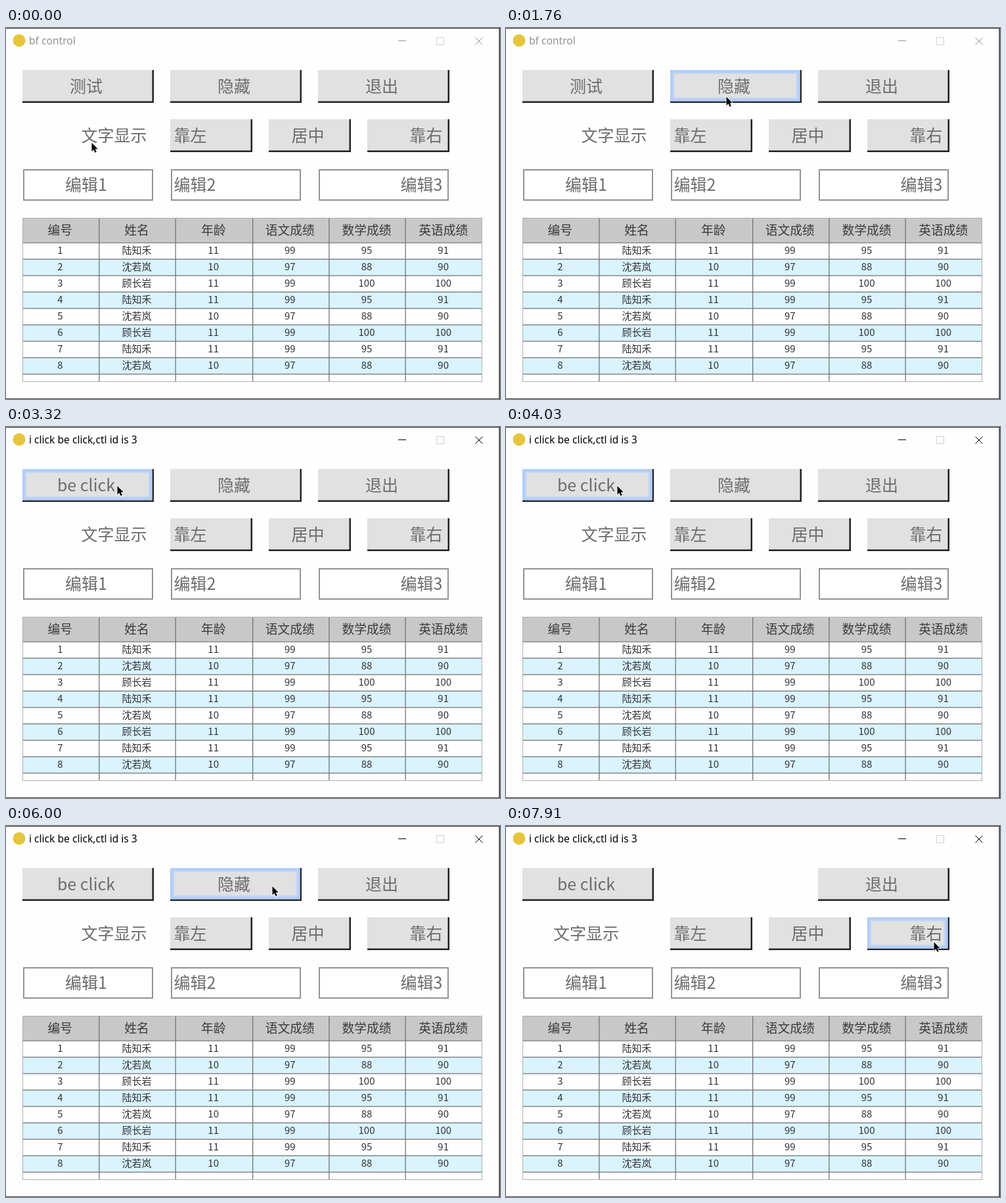
An HTML page for the animation above (8000 ms loop, 752 px wide and 565 px high).

```html
<!DOCTYPE html>
<html lang="zh-CN">
<head>
<meta charset="utf-8">
<title>bf control</title>
<style>
  html, body { margin: 0; width: 100%; height: 100%; overflow: hidden; background: #fefefe; }
  svg { display: block; width: 752px; height: 565px; }
  text { font-family: "Noto Sans CJK SC", "Noto Sans CJK", sans-serif; white-space: pre; }
  .control { font-size: 25px; fill: #6c6c6c; }
  .head { font-size: 18.75px; fill: #3a3a3a; }
  .cell { font-size: 15px; fill: #333; }
  .title { font: 15.6px "Noto Sans", "Noto Sans CJK SC", "Noto Sans CJK", sans-serif; }
  #frame { --ink: #000; }
  #frame.idle { --ink: #929292; }
  .title { fill: var(--ink); }
  .sign { stroke: var(--ink); fill: none; }
</style>
</head>
<body>
<svg viewBox="0 0 752 565" xmlns="http://www.w3.org/2000/svg">
  <rect width="752" height="565" fill="#fefefe"/>
  <path d="M0 .5H752" stroke="#3d3626"/>
  <path d="M750.5 1V565" stroke="#8b8a88"/>
  <path d="M751.5 0V565" stroke="#4a453c"/>
  <path d="M0 564.5H752" stroke="#4b4a35"/>
  <g id="frame" class="idle">
    <circle cx="20" cy="19" r="9.5" fill="#e6c53a"/>
    <text id="title" class="title" x="35" y="25"></text>
    <path class="sign" d="M597 19.5H609M714.5 14.5L725.5 25.5M725.5 14.5L714.5 25.5"/>
    <rect x="655.5" y="14.5" width="11" height="11" fill="none" stroke="#d2d2d2"/>
  </g>
  <g id="controls"></g>
  <g id="table"></g>
  <path id="cursor" d="M.5 .8V14L3.5 11.2L5.5 15.8L7.8 14.8L5.8 10.3H9.8Z" stroke="#fff" stroke-width="1.6" paint-order="stroke"/>
</svg>
<script>
const LOOP = 8000;
const STEP = 140;     // typical time between mouse samples
const SCALE = 1.25;   // display scaling of the window content
const LINE = SCALE;
const $ = id => document.getElementById(id);

function add(parent, tag, attrs, text) {
  const el = document.createElementNS("http://www.w3.org/2000/svg", tag);
  for (const key in attrs) el.setAttribute(key, attrs[key]);
  if (text !== undefined) el.textContent = text;
  parent.append(el);
  return el;
}

const box = (parent, x, y, width, height, attrs) =>
  add(parent, "rect", { x, y, width, height, ...attrs });

const write = (parent, cls, x, y, anchor, text) =>
  add(parent, "text", { class: cls, x, y, "text-anchor": anchor }, text);

// Text anchor point inside a control
const place = {
  start: (x, w) => x + 5.5,
  middle: (x, w) => x + w / 2 - 3,
  end: (x, w) => x + w - 10.5
};

function button(x, y, w, text, anchor) {
  const g = add($("controls"), "g");
  const h = 50, bevel = 2 * LINE;
  box(g, x, y, w, h, { fill: "#e1e1e1" });
  add(g, "path", {
    d: `M${x} ${y + h - bevel / 2}H${x + w - bevel / 2}V${y}`,
    fill: "none", stroke: "#222", "stroke-width": bevel
  });
  const glow = add(g, "g", { fill: "none" });
  const ring = (inset, stroke, width) =>
    box(glow, x + inset, y + inset, w - bevel - 2 * inset, h - bevel - 2 * inset, { stroke, "stroke-width": width });
  ring(2, "#b0cdfd", 4);
  ring(5, "#c6d6f0", 2);
  const label = write(g, "control", place[anchor](x, w), y + 34, anchor, text);
  return { g, glow, label, x, y, w, h };
}

function edit(x, text, anchor) {
  box($("controls"), x + 2, 216, 196, 46, { fill: "#fff", stroke: "#939393", "stroke-width": 2 });
  write($("controls"), "control", place[anchor](x, 200), 248, anchor, text);
}

const [test, hide, quit] = ["测试", "隐藏", "退出"].map((name, i) => button(25 + 225 * i, 64, 200, name, "middle"));
const anchors = ["start", "middle", "end"];
const aligners = ["靠左", "居中", "靠右"].map((name, i) => button(250 + 150 * i, 139, 125, name, anchors[i]));
const buttons = [test, hide, quit, ...aligners];
const caption = write($("controls"), "control", 0, 173, "end", "文字显示");
["middle", "start", "end"].forEach((anchor, i) => edit(25 + 225 * i, `编辑${i + 1}`, anchor));

function drawTable() {
  const g = $("table"), left = 25, top = 289, width = 700, height = 250;
  const col = width / 6, row = 25, body = top + 37.5;
  const heads = ["编号", "姓名", "年龄", "语文成绩", "数学成绩", "英语成绩"];
  const pupils = [
    ["陆知禾", 11, 99, 95, 91],
    ["沈若岚", 10, 97, 88, 90],
    ["顾长岩", 11, 99, 100, 100]
  ];
  const middle = i => left + col * (i + .5) - 1;
  const snap = x => Math.floor(x / SCALE + .01) * SCALE + LINE / 2;

  box(g, left, top, width, body - top, { fill: "#c8c8c8" });
  heads.forEach((name, i) => write(g, "head", middle(i), 315, "middle", name));
  let lines = "";
  for (let r = 0; r <= 8; r++) {
    const y = body + r * row;
    lines += `M${left} ${y + LINE / 2}h${width}`;
    if (r == 8) break;
    if (r % 2) box(g, left, y, width, row, { fill: "#d9f3ff" });
    [r + 1, ...pupils[r % 3]].forEach((v, i) => write(g, "cell", middle(i), y + 17.5, "middle", v));
  }
  for (let i = 1; i < 6; i++) lines += `M${snap(left + col * i)} ${top}v${height}`;
  add(g, "path", { d: lines, stroke: "#707070", "stroke-width": LINE });
  box(g, left + .5, top + .5, width - 1, height - 1, { fill: "none", stroke: "#b0b0b0" });
}
drawTable();

// Mouse strokes: start, end, then the point reached
const home = { x: 130, y: 174 };
const strokes = [
  [20, 570, 24, 190], [570, 980, 79, 110],
  [980, 1390, 228, 147], [1390, 1660, 335, 104], [1660, 2340, 169, 89],
  [4030, 4430, 379, 90], [4850, 5140, 421, 102],
  [5310, 5590, 495, 93], [5730, 6000, 405, 91],
  [6410, 6830, 314, 160], [7140, 7500, 470, 176], [7750, 7910, 651, 176]
];
const ease = p => p * p * (3 - 2 * p);

function mouseAt(t) {
  let { x, y } = home;
  for (const [start, end, toX, toY] of strokes) {
    if (t < start) break;
    const steps = Math.round((end - start) / STEP);
    const p = t >= end ? 1 : ease(Math.floor((t - start) / (end - start) * steps) / steps);
    x += (toX - x) * p;
    y += (toY - y) * p;
  }
  return { x: Math.round(x), y: Math.round(y) };
}

function titleAt(t) {
  if (t < 2600) return "bf control";
  return `i click ${t < 3320 ? "测试" : "be click"},ctl id is 3`;
}

function render(t) {
  const { x, y } = mouseAt(t);
  $("cursor").setAttribute("transform", `translate(${x} ${y})`);

  $("frame").classList.toggle("idle", t < 2470);
  $("title").textContent = titleAt(t);
  test.label.textContent = t < 2600 ? "测试" : "be click";
  hide.g.style.display = t < 6130 ? "" : "none";

  const align = t < 6980 ? "end" : t < 7620 ? "start" : "middle";
  caption.setAttribute("text-anchor", align);
  caption.setAttribute("x", place[align](25, 200));

  for (const b of buttons) {
    const over = x >= b.x && x < b.x + b.w && y >= b.y && y < b.y + b.h;
    b.glow.style.display = over ? "" : "none";
  }
}

const start = performance.now();
function tick() {
  render((performance.now() - start) % LOOP);
  requestAnimationFrame(tick);
}
tick();
</script>
</body>
</html>
```
